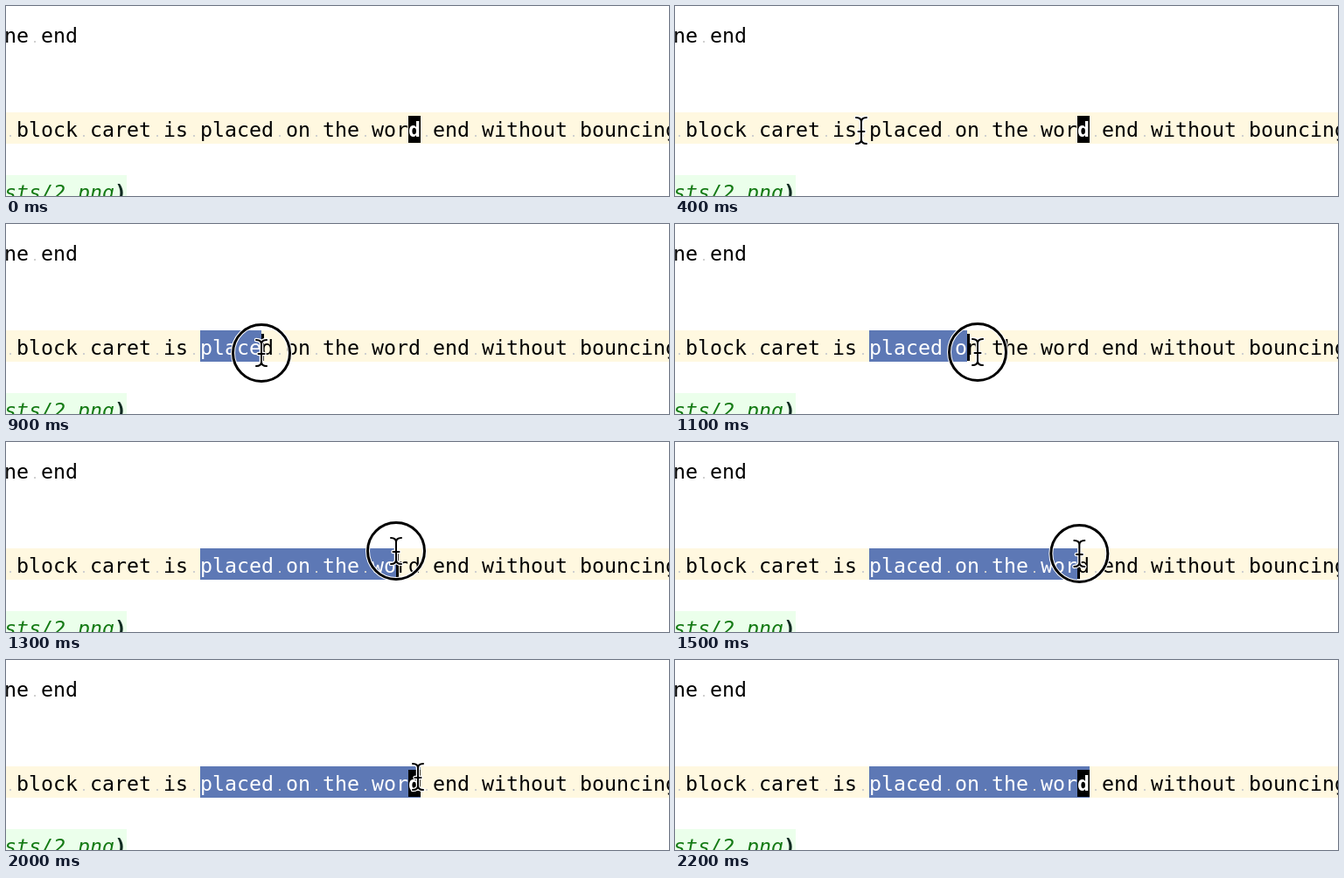
Animation, 758 px wide and 218 px high, one loop 3 s. Source, as an HTML page with a canvas:

```html
<!DOCTYPE html>
<html lang="en">
<head>
<meta charset="utf-8">
<title>Block caret selection</title>
<style>
  html, body { margin: 0; width: 758px; height: 218px; overflow: hidden; background: #fff; }
  canvas { display: block; }
</style>
</head>
<body>
<canvas id="stage" width="758" height="218"></canvas>
<script>
const ctx = document.getElementById('stage').getContext('2d');
const LOOP = 3000, TICK = 100;
const CELL = 14, LEFT = 12;
const LINE = 'block caret is placed on the word end without bouncing';
const ANCHOR = LINE.indexOf('placed');
const LAST = LINE.indexOf('word') + 3;
const PRESS = 7, RELEASE = 20, GONE = 22;

// Pointer path: tick, x, y
const PATH = [
  [1, 720, 49], [2, 430, 105], [3, 270, 135], [4, 213, 143],
  [6, 219, 146], [7, 225, 147], [8, 254, 148], [9, 292, 148],
  [11, 346, 147], [12, 396, 128], [13, 446, 125], [14, 460, 126],
  [17, 467, 132], [18, 471, 132], [20, 471, 134], [21, 474, 186], [22, 476, 240]
];

const cellX = i => LEFT + i * CELL;

function box(color, x, y, w, h) {
  ctx.fillStyle = color;
  ctx.fillRect(x, y, w, h);
}

// Draws text on the character grid, with a faint dot for each space.
function text(str, cell, baseline, color, style = '') {
  ctx.font = `${style} 23.254px "DejaVu Sans Mono", monospace`;
  [...str].forEach((ch, i) => {
    const x = cellX(cell + i);
    if (ch === ' ') box('#cfcfcf', x + 6, baseline - 2, 2, 2);
    else {
      ctx.fillStyle = color;
      ctx.fillText(ch, x, baseline);
    }
  });
}

function pointerAt(tick) {
  const i = PATH.findIndex(p => p[0] >= tick);
  const [t1, x1, y1] = PATH[i];
  const [t0, x0, y0] = PATH[Math.max(0, i - 1)];
  const k = t1 > t0 ? (tick - t0) / (t1 - t0) : 1;
  return [x0 + (x1 - x0) * k, y0 + (y1 - y0) * k];
}

function outline(path, inner, outer) {
  ctx.strokeStyle = '#fff';
  ctx.lineWidth = outer;
  ctx.stroke(path);
  ctx.strokeStyle = '#000';
  ctx.lineWidth = inner;
  ctx.stroke(path);
}

const beam = new Path2D(
  'M-6 -15Q0 -15 0 -10Q0 -15 6 -15M0 -10V10M-6 15Q0 15 0 10Q0 15 6 15M-3.5 1H3.5');
const ring = new Path2D();
ring.arc(0, 0, 32.5, 0, 2 * Math.PI);

function drawPointer(x, y, pressed) {
  ctx.save();
  ctx.translate(x, y);
  ctx.lineCap = 'round';
  if (pressed) outline(ring, 3, 5);
  outline(beam, 2, 4.5);
  ctx.restore();
}

function draw(tick) {
  const visible = tick >= 1 && tick < GONE;
  const dragging = tick >= PRESS && tick < RELEASE;
  const [x, y] = visible ? pointerAt(tick) : [0, 0];
  const caret = dragging ? Math.floor((x - LEFT) / CELL) : LAST;
  const end = tick < PRESS ? ANCHOR : dragging ? caret : LAST + 1;

  box('#fff', 0, 0, 758, 218);
  box('#fff8e0', 0, 122, 758, 36);
  box('#ebffeb', 0, 194, 138, 24);
  text('ne end', -1, 42, '#000');
  text('sts/2.png', -1, 222, '#147a14', 'italic');
  text(')', 8, 222, '#102a20', 'bold');

  box('#5d78b5', cellX(ANCHOR), 122, (end - ANCHOR) * CELL, 36);
  text(' ' + LINE.slice(0, ANCHOR), -1, 150, '#000');
  text(LINE.slice(ANCHOR, end), ANCHOR, 150, '#fff');
  text(LINE.slice(end), end, 150, '#000');

  box('#000', cellX(caret), 126, dragging ? 3 : CELL, 31);
  if (!dragging) text(LINE[LAST], LAST, 150, '#fff', 'bold');
  if (visible) drawPointer(x, y, dragging);
}

const start = performance.now();
function frame() {
  draw(Math.floor((performance.now() - start) % LOOP / TICK));
  requestAnimationFrame(frame);
}
frame();
</script>
</body>
</html>
```
